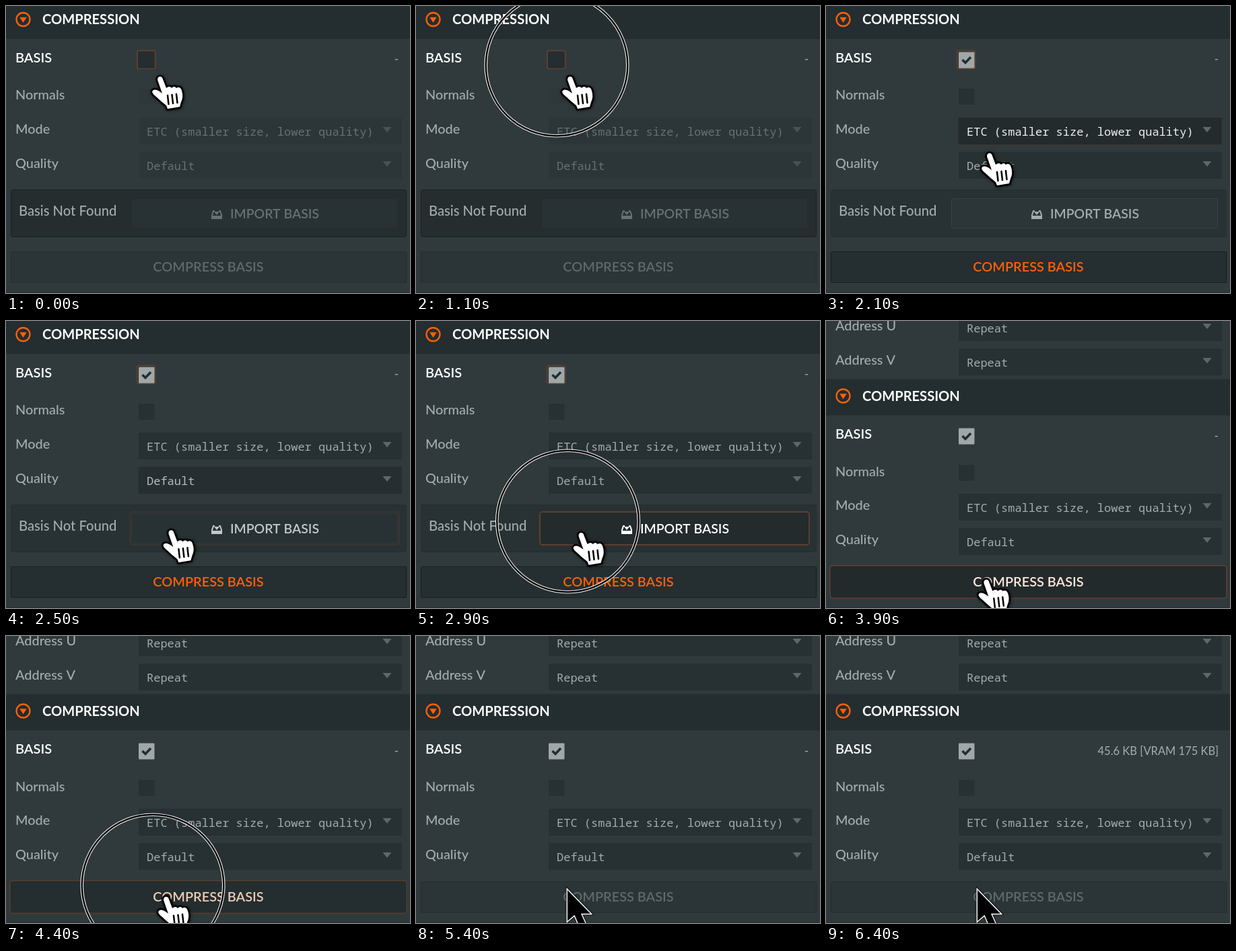
Write an HTML page with a canvas that moves like this. It is 600 px wide and 427 px high and loops after 6500 ms.

```html
<!DOCTYPE html>
<html lang="en">
<head>
<meta charset="utf-8">
<title>Compression panel</title>
<style>
html, body { margin: 0; width: 100%; height: 100%; overflow: hidden; background: #303a3c; }
canvas { display: block; width: 600px; height: 427px; }
</style>
</head>
<body>
<canvas id="stage"></canvas>
<script>
const W = 600, H = 427, LOOP = 6500, STEP = 100;
const canvas = document.getElementById('stage');
const ctx = canvas.getContext('2d');
const dpr = window.devicePixelRatio || 1;
canvas.width = W * dpr;
canvas.height = H * dpr;

const SANS = 'Lato, "Open Sans", sans-serif';
const MONO = '"Noto Sans Mono", "DejaVu Sans Mono", monospace';
const C = {
  bg: [48, 58, 60], head: [36, 45, 47], field: [39, 48, 50], off: [44, 53, 55],
  hot: [35, 43, 45], panel: [37, 45, 47], text: [164, 172, 174], dim: [103, 112, 114],
  white: [255, 255, 255], orange: [255, 96, 8], rim: [94, 63, 46], line: [26, 32, 34]
};

const rgb = c => `rgb(${c.map(Math.round).join()})`;
const mix = (a, b, k) => a.map((v, i) => v + (b[i] - v) * k);
const ramp = (t, a, b) => Math.min(1, Math.max(0, (t - a) / (b - a)));
const pulse = (t, on, off) => ramp(t, on, on + 200) * (1 - ramp(t, off, off + 200));
const smooth = k => k * k * (3 - 2 * k);

function box(x, y, w, h, fill, stroke, line = 1, r = 1) {
  ctx.beginPath();
  ctx.roundRect(x, y, w, h, r);
  ctx.fillStyle = rgb(fill);
  ctx.fill();
  if (stroke) {
    ctx.strokeStyle = rgb(stroke);
    ctx.lineWidth = line;
    ctx.stroke();
  }
}

// y is the middle of the capitals
function text(str, x, y, color, size = 19.9, weight = 500, align = 'left', family = SANS) {
  ctx.font = `${weight} ${size}px ${family}`;
  ctx.textAlign = align;
  ctx.fillStyle = rgb(color);
  ctx.fillText(str, x, y + size * 0.36);
}

function poly(points, dx = 0, dy = 0) {
  ctx.beginPath();
  points.forEach(([x, y]) => ctx.lineTo(x + dx, y + dy));
  ctx.closePath();
}

function triangle(x, y, w, h, color) {
  poly([[-w / 2, -h / 2], [w / 2, -h / 2], [0, h / 2]], x, y);
  ctx.fillStyle = rgb(color);
  ctx.fill();
}

function select(label, value, y, enabled, hover) {
  text(label, 14, y, C.text);
  const fill = mix(mix(C.off, C.field, enabled), C.hot, hover);
  box(197, y - 17, 391, 40, fill);
  if (hover > 0) {
    ctx.globalAlpha = hover;
    box(196, y - 17.5, 392, 41, fill, [62, 53, 48]);
    ctx.globalAlpha = 1;
  }
  const color = mix(mix(C.dim, C.text, enabled), [238, 240, 240], hover);
  text(value, 209, y + 4, color, 17, 500, 'left', MONO);
  triangle(566, y + 1, 13, 8, mix([72, 82, 84], [94, 104, 106], Math.max(enabled, hover)));
}

function header(y) {
  box(0, y - 25, W, 54, C.head, null, 1, 0);
  ctx.beginPath();
  ctx.arc(25.5, y, 10, 0, 7);
  ctx.strokeStyle = rgb(C.orange);
  ctx.lineWidth = 2.3;
  ctx.stroke();
  triangle(25.5, y + 0.7, 10.5, 8, C.orange);
  text('COMPRESSION', 54, y, C.white, 20.1, 700);
}

function checkbox(y, checked, focus) {
  if (focus) box(195, y - 13.5, 26.5, 26.5, C.head, C.rim, 2, 2);
  box(197, y - 11.5, 23.5, 24, checked ? [160, 167, 168] : C.head);
  if (!checked) return;
  ctx.beginPath();
  ctx.moveTo(202.5, y);
  ctx.lineTo(207, y + 4.5);
  ctx.lineTo(215, y - 4);
  ctx.strokeStyle = rgb(C.head);
  ctx.lineWidth = 3.6;
  ctx.stroke();
}

function importIcon(x, y, color) {
  ctx.strokeStyle = ctx.fillStyle = rgb(color);
  ctx.lineWidth = 2;
  ctx.beginPath();
  ctx.moveTo(x - 3, y - 5);
  ctx.lineTo(x - 5, y - 5);
  ctx.lineTo(x - 7, y + 1);
  ctx.lineTo(x - 7, y + 6);
  ctx.lineTo(x + 7, y + 6);
  ctx.lineTo(x + 7, y + 1);
  ctx.lineTo(x + 5, y - 5);
  ctx.lineTo(x + 3, y - 5);
  ctx.stroke();
  ctx.fillRect(x - 7, y + 2, 14, 4);
  triangle(x, y - 1.5, 8, 5, color);
}

function importRow(enabled, hover) {
  box(7.5, 273.5, 587, 70, mix(C.panel, [40, 49, 51], enabled), mix(C.line, C.panel, enabled), 1, 3);
  text('Basis Not Found', 19, 305, C.text, 20.2);
  const fill = mix(mix([40, 49, 51], [44, 54, 56], enabled), C.hot, hover);
  box(186.5, 286.5, 395, 44, fill, mix([37, 45, 47], [55, 64, 66], enabled), 1, 2);
  if (hover > 0) {
    ctx.globalAlpha = hover;
    box(184, 284, 400, 49, fill, C.rim, 2, 4);
    ctx.globalAlpha = 1;
  }
  const color = mix(mix(C.dim, C.text, enabled), C.white, hover);
  importIcon(313, 310, color);
  text('IMPORT BASIS', 333, 309, color, 19.4, 600);
}

function compressButton(enabled, hover) {
  const fill = mix(mix([43, 52, 54], [37, 46, 48], enabled), C.hot, hover);
  box(7.5, 365.5, 587, 46, fill, mix([37, 46, 48], C.line, enabled), 1.2, 2);
  if (hover > 0) {
    ctx.globalAlpha = hover;
    box(6, 364, 589, 48.5, fill, C.rim, 2, 4);
    ctx.globalAlpha = 1;
  }
  const color = mix(mix([95, 104, 106], C.orange, enabled), C.white, hover);
  text('COMPRESS BASIS', 300.5, 388, color, 19.9, 600, 'center');
}

function hand(x, y) {
  ctx.save();
  ctx.translate(x, y);
  ctx.beginPath();
  ctx.moveTo(-4, 5);
  ctx.quadraticCurveTo(-4, 0, 0, 0);
  ctx.quadraticCurveTo(3, 0, 4, 4);
  ctx.lineTo(9, 17);
  ctx.quadraticCurveTo(14, 13, 17, 17);
  ctx.quadraticCurveTo(21, 13, 24, 17);
  ctx.quadraticCurveTo(30, 14, 32, 21);
  ctx.quadraticCurveTo(35, 30, 31, 38);
  ctx.lineTo(29, 45);
  ctx.lineTo(11, 48);
  ctx.lineTo(9, 43);
  ctx.quadraticCurveTo(0, 36, -6, 30);
  ctx.quadraticCurveTo(-15, 23, -10, 20);
  ctx.quadraticCurveTo(-6, 18, 3, 25);
  ctx.closePath();
  ctx.lineJoin = ctx.lineCap = 'round';
  ctx.strokeStyle = '#000';
  ctx.lineWidth = 5.5;
  ctx.shadowColor = 'rgba(0,0,0,0.5)';
  ctx.shadowBlur = 4 * dpr;
  ctx.shadowOffsetX = ctx.shadowOffsetY = dpr;
  ctx.stroke();
  ctx.shadowColor = 'transparent';
  ctx.fillStyle = '#fff';
  ctx.fill();
  ctx.lineWidth = 2.5;
  ctx.beginPath();
  for (let i = 0; i < 3; i++) {
    ctx.moveTo(11 + i * 6.5, 28 - i);
    ctx.lineTo(12.5 + i * 6.5, 41 - i);
  }
  ctx.stroke();
  ctx.restore();
}

function arrow(x, y) {
  poly([[0, 0], [0, 46], [10.5, 37], [19, 57], [28, 53], [20, 35], [34, 35]], x, y);
  ctx.lineJoin = 'miter';
  ctx.strokeStyle = '#000';
  ctx.lineWidth = 4.6;
  ctx.stroke();
  ctx.strokeStyle = '#fff';
  ctx.lineWidth = 3;
  ctx.stroke();
  ctx.fillStyle = '#000';
  ctx.fill();
}

function ring(x, y) {
  ctx.beginPath();
  ctx.arc(x - 20, y - 17, 105.3, 0, 7);
  ctx.strokeStyle = '#f4f4f4';
  ctx.lineWidth = 4.6;
  ctx.stroke();
  ctx.strokeStyle = '#000';
  ctx.lineWidth = 2.4;
  ctx.stroke();
}

// time, x, y of the pointer tip
const PATH = [[0, 229, 105], [1800, 229, 105], [2100, 243, 219], [2600, 245.5, 315], [3200, 245.5, 315], [4000, 238, 388], [LOOP, 238, 388]];

function pointer(t) {
  const i = PATH.findIndex(p => p[0] > t);
  const [t0, x0, y0] = PATH[i - 1], [t1, x1, y1] = PATH[i];
  const k = ramp(t, t0, t1);
  const e = t0 === 1800 ? k * k * (1.6 - 0.6 * k) : t0 === 2100 ? 1 - (1 - k) ** 2 : smooth(k);
  return [x0 + (x1 - x0) * e, y0 + (y1 - y0) * e];
}

function draw(t) {
  const checked = t >= 1300, imported = t >= 3200;
  const enabled = ramp(t, 1200, 1600);
  const y = imported ? 91.5 : 0;
  const yBox = Math.floor(y);

  ctx.setTransform(dpr, 0, 0, dpr, 0, 0);
  ctx.fillStyle = rgb(C.bg);
  ctx.fillRect(0, 0, W, H);

  if (imported) {
    select('Address U', 'Repeat', 7, 1, 0);
    select('Address V', 'Repeat', 58, 1, 0);
  }
  header(20 + y);
  text('BASIS', 14, 76.5 + y, C.white, 20, 600);
  checkbox(80 + yBox, checked, !imported);
  if (t >= 6100) text('45.6 KB [VRAM 175 KB]', 583, 171, C.text, 16.5, 400, 'right');
  else text('-', 580, 79 + y, C.text, 17, 400, 'center');

  text('Normals', 14, 132 + y, C.text);
  box(197, 123 + yBox, 23.5, 24, mix([46, 55, 57], C.field, enabled));
  select('Mode', 'ETC (smaller size, lower quality)', 183 + yBox, enabled, pulse(t, 1850, 2100));
  const qualityHover = Math.max(pulse(t, 2100, 2350), pulse(t, 3100, 3400));
  select('Quality', 'Default', 234 + yBox, enabled, qualityHover);
  if (!imported) importRow(enabled, ramp(t, 2400, 2700));
  compressButton(enabled * (1 - ramp(t, 4300, 4600)), ramp(t, 3600, 3950) * (1 - ramp(t, 4300, 4600)));
  ctx.fillStyle = rgb(C.head);
  ctx.fillRect(0, 426, W, 1);

  const [px, py] = pointer(t);
  if ([1100, 2800, 4300].some(s => t >= s && t < s + 200)) ring(px, py);
  if (t < 4600) hand(px, py);
  else arrow(225, 378);
}

const start = performance.now();
function tick() {
  const t = (performance.now() - start) % LOOP;
  draw(Math.floor(t / STEP) * STEP);
  requestAnimationFrame(tick);
}
tick();
</script>
</body>
</html>
```
